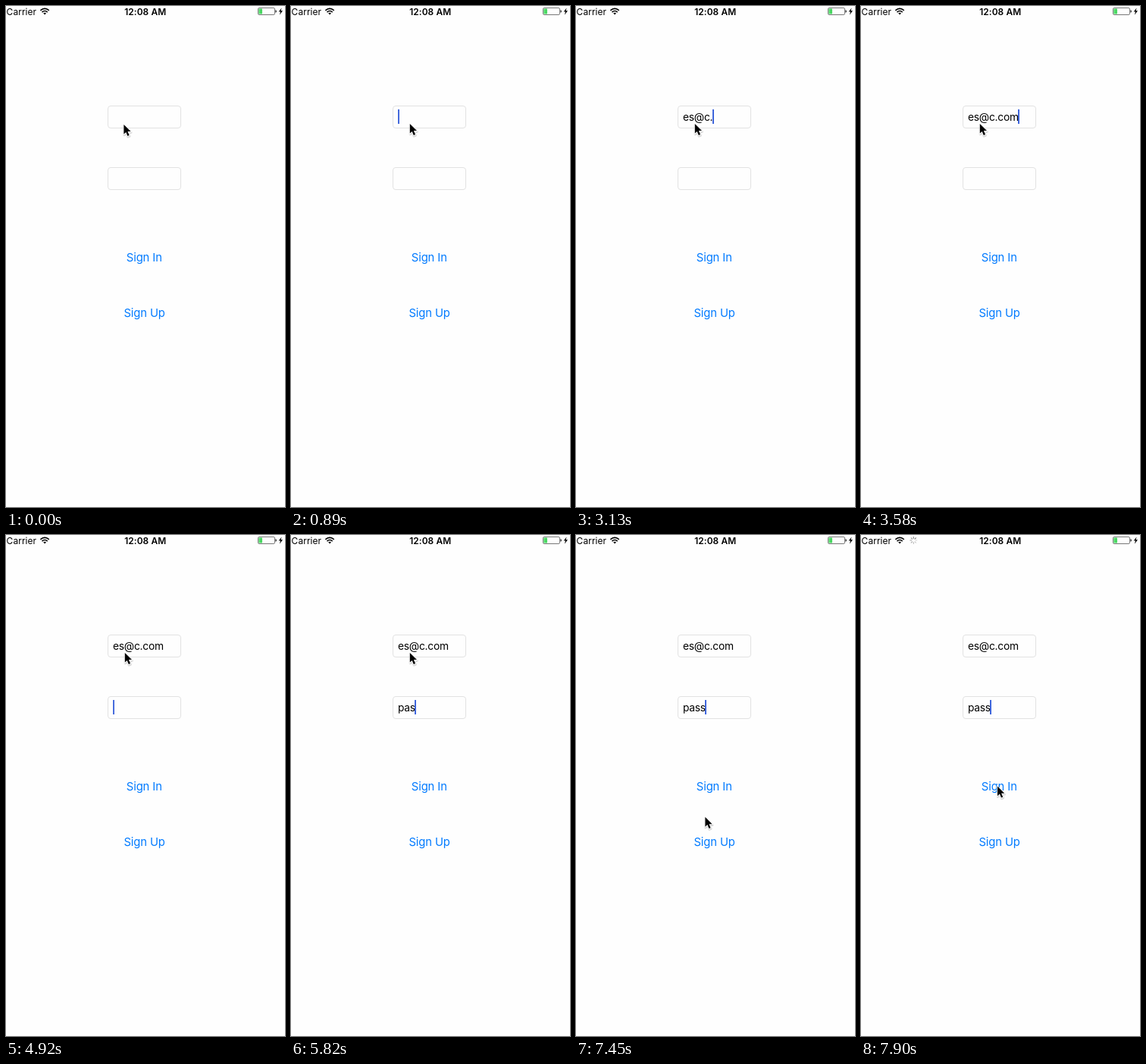
Animation of 368x659 px, one loop 8 s. Source, as an HTML page:

```html
<!DOCTYPE html>
<html lang="en">
<head>
<meta charset="utf-8">
<title>Sign in form</title>
<style>
  html, body { margin: 0; width: 100%; height: 100%; overflow: hidden; background: #fefefe; }
  svg { display: block; width: 100%; height: 100%; font-family: Inter, Roboto, sans-serif; }
  .status { font-size: 11.9px; letter-spacing: .1px; }
  .time { font-weight: 600; text-anchor: middle; }
  .box { fill: #fefefe; stroke: #e2e2e2; }
  .input { font-size: 13.8px; letter-spacing: -.25px; white-space: pre; }
  .button { font-size: 14.8px; letter-spacing: -.1px; fill: #007aff; text-anchor: middle; }
</style>
</head>
<body>
<svg viewBox="0 0 368 659">
  <text class="status" x=".6" y="11.6">Carrier</text>
  <g fill="none" stroke="#000" stroke-width="1.6">
    <path d="M45.4 5.9Q51.1 .8 56.8 5.9M47.5 8.1Q51.1 4.9 54.7 8.1"/>
    <path d="M51.1 11.6L49.2 9.5Q51.1 8 53 9.5Z" fill="#000" stroke="none"/>
  </g>
  <g id="spinner" stroke="#777" stroke-width="1.1" stroke-linecap="round"></g>
  <text class="status time" x="183.7" y="11.6">12:08 AM</text>
  <rect x="332.5" y="2.5" width="22" height="9" rx="1.6" fill="none" stroke="#777"/>
  <rect x="333.4" y="3.4" width="4.6" height="7.2" rx=".5" fill="#4cd964"/>
  <path d="M355.4 5.2Q357 5.4 357 7T355.4 8.8Z" fill="#333"/>
  <path d="M363.6 2.4L359.7 7.6H362L360.8 11.8L365 6.3H362.5Z"/>

  <rect class="box" x="134.5" y="131.5" width="96" height="29" rx="3.5"/>
  <rect class="box" x="134.5" y="212.5" width="96" height="29" rx="3.5"/>
  <text class="input" id="email" x="141" y="150.6"></text>
  <text class="input" id="password" x="141" y="231.6"></text>
  <rect id="caret" width="2" height="19" fill="#3f66dc"/>

  <text class="button" id="signIn" x="182.3" y="335.6">Sign In</text>
  <text class="button" x="182.6" y="408.6">Sign Up</text>

  <g id="pointer">
    <path d="M0 0V12.6L2.9 9.9L5 15L7.2 14.1L5.1 9.1H9.2Z" transform="translate(.4 1.2)"
      fill="none" stroke="#000" stroke-opacity=".14" stroke-width="3" stroke-linejoin="round"/>
    <path d="M0 0V12.6L2.9 9.9L5 15L7.2 14.1L5.1 9.1H9.2Z" stroke="#fff" stroke-width="1.6"
      paint-order="stroke"/>
  </g>
</svg>
<script>
const LOOP = 8000;
const STEP = 149; // the screen refreshes at this interval
const SPOKES = 8;
const PRESS = 7500, RELEASE = 7800, LOADING = 7700;

const $ = id => document.getElementById(id);
const caret = $('caret'), signIn = $('signIn'), spinner = $('spinner'), pointer = $('pointer');

// Keystroke times, one per character.
const fields = [
  { node: $('email'), text: 'es@c.com', caretY: 136, focus: 290,
    keys: [1150, 1633, 2300, 2600, 3050, 3300, 3410, 3570] },
  { node: $('password'), text: 'pass', caretY: 217, focus: 4310,
    keys: [5150, 5300, 5750, 6265] },
];

const HOME = { x: 155.4, y: 156 };
const moves = [
  { from: 0, to: 140, x: 156.8, y: 155 },
  { from: 6600, to: 7000, x: 160.8, y: 411.6 },
  { from: 7150, to: 7750, x: 180, y: 330.6 },
];

const clamp = v => Math.min(1, Math.max(0, v));
const ease = p => p * p * (3 - 2 * p);

// Solid after each keystroke, then a short fade and a gap.
const blink = age => clamp((750 - age % 1050) / 150);

const spokes = Array.from({ length: SPOKES }, (_, i) => {
  const line = document.createElementNS('http://www.w3.org/2000/svg', 'path');
  line.setAttribute('d', 'M0 -2.5V-4.4');
  line.setAttribute('transform', `translate(69.3 7) rotate(${i * 360 / SPOKES})`);
  spinner.append(line);
  return line;
});

function drawFields(t) {
  for (const { node, text, keys } of fields) {
    node.textContent = text.slice(0, keys.filter(key => key <= t).length);
  }
  const active = fields.findLast(field => field.focus <= t);
  caret.setAttribute('visibility', active ? 'visible' : 'hidden');
  if (!active) return;

  const { node, keys, focus, caretY } = active;
  const width = node.textContent ? node.getComputedTextLength() : 0;
  const lastInput = Math.max(focus, ...keys.filter(key => key <= t));
  caret.setAttribute('x', Math.floor(141 + width));
  caret.setAttribute('y', caretY);
  caret.setAttribute('opacity', blink(t - lastInput));
}

function drawPointer(t) {
  let { x, y } = HOME;
  for (const move of moves) {
    const p = ease(clamp((t - move.from) / (move.to - move.from)));
    x += (move.x - x) * p;
    y += (move.y - y) * p;
  }
  pointer.setAttribute('transform', `translate(${x} ${y})`);
}

function drawSpinner(t) {
  spinner.setAttribute('visibility', t >= LOADING ? 'visible' : 'hidden');
  const head = Math.floor(t / 75);
  spokes.forEach((line, i) => {
    const age = (head - i + SPOKES) % SPOKES;
    line.setAttribute('opacity', 1 - age * .1);
  });
}

function render(time) {
  const t = Math.floor((time + 10) / STEP) * STEP;
  drawFields(t);
  drawPointer(t);
  drawSpinner(t);
  signIn.setAttribute('opacity', t >= PRESS && t < RELEASE ? .25 : 1);
}

const start = performance.now();
function tick() {
  render((performance.now() - start) % LOOP);
  requestAnimationFrame(tick);
}
tick();
</script>
</body>
</html>
```
